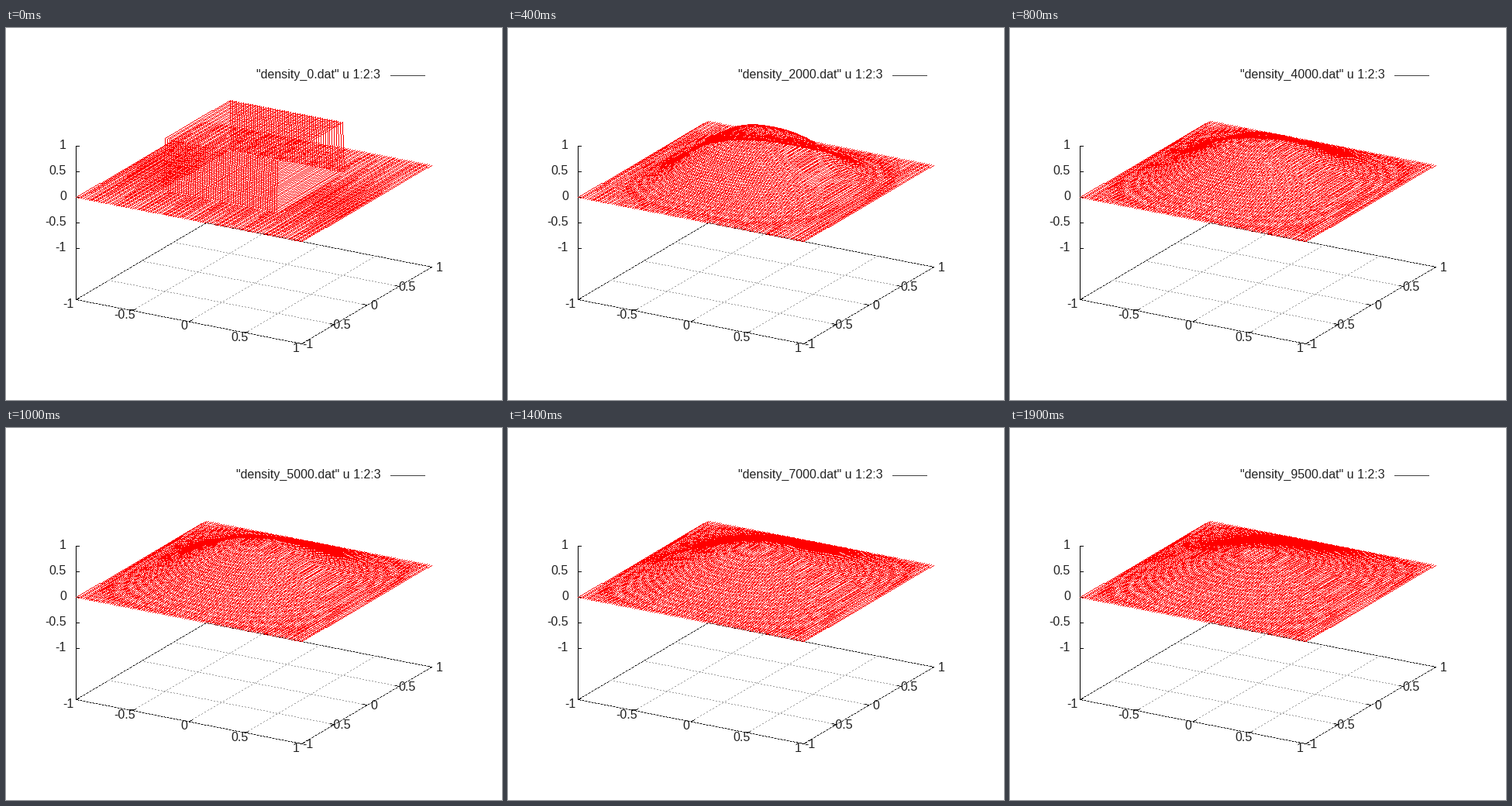
Animation of 640x480 px, one loop 2000 ms. Source, as a matplotlib script:

```python
import numpy as np
import matplotlib.pyplot as plt
from matplotlib.animation import FuncAnimation

W, H, DPI = 640, 480, 100
FRAMES, INTERVAL = 20, 100
STEPS_PER_FRAME = 500
DIFFUSION = 1e-5              # diffusivity times time step
RED, BLACK, GREY, KEY = (255, 0, 0), (0, 0, 0), (160, 160, 160), (64, 64, 64)
FLOOR = -2.0
TICKS = (-1, -0.5, 0, 0.5, 1)

plt.rcParams["font.family"] = "Liberation Sans"


def project(x, y, z):
    """View at 60, 30 degrees, cut to whole pixels (rows count downwards)."""
    sx = 320 + 145.5 * x + 84 * y
    sy = 229.8 + 28.5 * x - 49.36 * y - 65.8 * (z + 0.5)
    return np.stack(np.broadcast_arrays(np.floor(sx), np.ceil(sy)), axis=-1)


def draw(img, start, end, color, dash=None):
    """Draw one-pixel lines without smoothing between integer points."""
    p = np.rint(np.atleast_2d(start))
    d = np.rint(np.atleast_2d(end)) - p
    n = np.maximum(np.abs(d).max(axis=1), 1)
    step = np.arange(int(n.max()) + 1)
    if dash:
        on, period = dash
        step = step[step % period < on]
    t = np.minimum(step / n[:, None], 1)[..., None]
    xy = np.floor(p[:, None] + d[:, None] * t + 0.5).astype(int)
    img[xy[..., 1], xy[..., 0]] = color


def profile(x, tau):
    """Unit box of width 1 after diffusing for tau, held at zero at the ends."""
    if tau == 0:
        return (np.abs(x) < 0.501).astype(float)
    k = np.arange(1, 60, 2)[:, None] * np.pi / 2
    terms = 2 / k * np.sin(k / 2) * np.cos(k * x) * np.exp(-k * k * tau)
    return terms.sum(axis=0)


def make_backdrop():
    img = np.full((H, W, 3), 255, np.uint8)
    corners = [project(x, y, FLOOR) for x, y in ((-1, -1), (1, -1), (1, 1), (-1, 1))]
    for a, b in zip(corners, corners[1:] + corners[:1]):
        draw(img, a, b, BLACK)
    draw(img, corners[0], project(-1, -1, 1), BLACK)

    # The dotted grid also runs over the border.
    for v in TICKS:
        draw(img, project(v, -1, FLOOR), project(v, 1, FLOOR), GREY, (2, 4))
        draw(img, project(-1, v, FLOOR), project(1, v, FLOOR), GREY, (2, 4))

    for v in TICKS:
        a = project(v, -1, FLOOR)
        draw(img, a, a + (4, -2), BLACK)
        a = project(1, v, FLOOR)
        draw(img, a, a - (5, 1), BLACK)
        a = project(-1, -1, v)
        draw(img, a, a + (4, 0), BLACK)

    draw(img, (496, 61), (540, 61), KEY)
    return img


backdrop = make_backdrop()
grid = np.linspace(-1, 1, 101)
gx, gy = np.meshgrid(grid, grid, indexing="ij")

fig = plt.figure(figsize=(W / DPI, H / DPI), dpi=DPI, facecolor="white")
ax = fig.add_axes([0, 0, 1, 1])
picture = ax.imshow(backdrop, extent=(0, W, H, 0), interpolation="nearest", aspect="auto")
ax.set_xlim(0, W)
ax.set_ylim(H, 0)
ax.axis("off")


def label(x, y, s, ha="center"):
    return ax.text(x, y, s, ha=ha, va="baseline", fontsize=16 * 72 / DPI, color="#222222")


for v in TICKS:
    s = f"{v:g}"
    shift = -3 if v < 0 else 0
    x, y = project(v, -1, FLOOR)
    label(x - 6.5 + shift, y + 11, s)
    x, y = project(1, v, FLOOR)
    label(x + 10.2 + shift * 0.7, y + 6, s)
    x, y = project(-1, -1, v)
    label(78, y + 4, s, "right")

title = label(483.3, 65, "", "right")


def update(i):
    step = i * STEPS_PER_FRAME
    g = profile(grid, DIFFUSION * step)
    # One unbroken line: each row's end is joined to the next row's start.
    path = project(gx, gy, np.outer(g, g)).reshape(-1, 2)
    img = backdrop.copy()
    draw(img, path[:-1], path[1:], RED)
    picture.set_data(img)
    title.set_text(f'"density_{step}.dat" u 1:2:3')
    return picture, title


anim = FuncAnimation(fig, update, frames=FRAMES, interval=INTERVAL, repeat=True)
plt.show()
```
